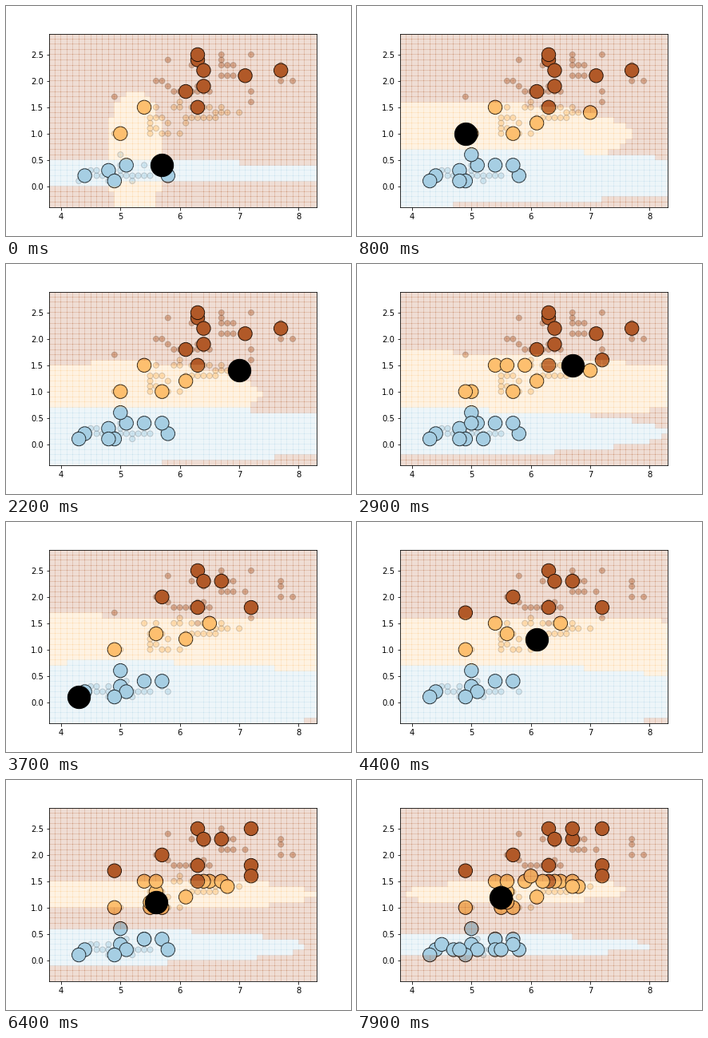
A matplotlib script for the animation above (8 s loop, 432x288 px).

```python
import numpy as np
import matplotlib.pyplot as plt
from matplotlib.animation import FuncAnimation
from matplotlib.colors import to_rgba_array

FRAMES, INTERVAL = 80, 100
X0, X1, Y0, Y1 = 38, 83, -4, 29  # plot limits in tenths
BLUE, ORANGE, BROWN = 0, 1, 2
COLORS = to_rgba_array(["#a6cee3", "#fdbf6f", "#b15928"])

# Labelled samples in query order, in tenths; the first 15 are given
RUN_A = [
    (63, 24), (63, 25), (64, 22), (77, 22), (71, 21), (61, 18), (64, 19),
    (63, 15), (54, 15), (50, 10), (44, 2), (48, 3), (49, 1), (58, 2), (51, 4),
    (57, 4), (43, 1), (50, 6), (48, 1), (57, 10), (54, 4), (61, 12), (70, 14),
    (49, 10), (59, 15), (72, 16), (50, 4), (56, 15), (52, 1), (67, 15),
    (60, 10),
]
RUN_B = [
    (63, 25), (64, 23), (67, 23), (57, 20), (63, 18), (72, 18), (49, 10),
    (56, 13), (61, 12), (65, 15), (50, 3), (51, 2), (49, 1), (54, 4), (44, 2),
    (50, 6), (57, 4), (43, 1), (49, 17), (54, 15), (55, 10), (67, 15),
    (57, 10), (54, 4), (72, 16), (64, 15), (58, 2), (63, 15), (56, 15),
    (68, 14), (72, 25), (55, 11), (56, 11), (67, 25), (57, 3), (59, 15),
    (45, 3), (62, 15), (54, 2), (60, 16), (47, 2), (67, 14), (55, 2), (48, 2),
    (55, 12),
]
LOW_BROWN = {(63, 15), (72, 16)}

# Evenly spaced rows of the remaining pool: y, first x, end, spacing
ROWS = [
    (2, 46, 56, 1), (3, 46, 52, 4), (10, 55, 61, 3), (12, 55, 59, 3),
    (13, 55, 58, 1), (13, 61, 67, 1), (14, 66, 69, 1), (15, 60, 65, 2),
    (18, 59, 66, 1), (19, 58, 64, 5), (20, 56, 58, 1), (20, 77, 80, 2),
    (21, 67, 70, 1), (23, 67, 70, 1), (23, 62, 78, 15), (24, 58, 68, 9),
]

# step: samples shown, then the orange and blue regions as sheared
# ellipses (centre x, centre y, shear, radius x, radius y)
KEYS_A = {
    0: (16, (52, 5.5, 0, 5, 12), (38, 2.1, 0, 69, 2.13)),
    7: (23, (50, 9, 0, 23.2, 6.2), (38, 1.35, 0, 58.7, 5.64)),
    15: (31, (38, 11.4, -.025, 60, 6.1), (45, 1.8, 0, 35.5, 4.17)),
}
KEYS_B = {
    0: (16, (38, 10.8, -.01, 100, 5.31), (49.5, .72, 0, 45.2, 6.4)),
    2: (18, (38, 10.8, -.01, 100, 5.31), (49.5, .72, 0, 45.2, 6.4)),
    17: (24, (38, 9.4, 0, 100, 6), (49, .25, 0, 38.7, 5.95)),
    29: (33, (55, 12, 0, 27.6, 2.88), (45, 2.1, 0, 35.4, 3.3)),
    44: (45, (57, 12.5, .02, 19, 2.2), (45, 2.3, 0, 34.6, 2.19)),
}

# first frame, samples, keys, first step
RUNS = [(0, RUN_A, KEYS_A, 0), (16, RUN_A, KEYS_A, 1), (35, RUN_B, KEYS_B, 0)]

cols = np.arange(X0, X1)
rows = np.arange(Y0, Y1)[:, None]


def label(p):
    if p[1] < 8:
        return BLUE
    return BROWN if p[1] >= 17 or p in LOW_BROWN else ORANGE


def colors(points):
    return COLORS[[label(p) for p in points]]


def inside(cx, cy, shear, rx, ry):
    dx = cols - cx
    dy = rows - cy - shear * dx
    return (dx / rx) ** 2 + (dy / ry) ** 2 < 1


def state(keys, step):
    """Sample count and class grid at a step."""
    table = np.array([np.hstack(k) for k in keys.values()])
    now = [np.interp(step, list(keys), column) for column in table.T]
    grid = np.full((Y1 - Y0, X1 - X0), BROWN)
    grid[inside(*now[1:6])] = ORANGE
    grid[inside(*now[6:])] = BLUE
    return int(now[0] + 1e-9), grid


fig = plt.figure(figsize=(6, 4), dpi=72)
ax = fig.add_axes([0.125, 0.125, 0.775, 0.755])
ax.set(xlim=(X0 / 10, X1 / 10), ylim=(Y0 / 10, Y1 / 10))

pool = sorted({*RUN_A, *RUN_B,
               *((x, y) for y, a, b, d in ROWS for x in range(a, b, d))})
faint = colors(pool)
faint[:, 3] = 0.4
ax.scatter(*np.array(pool).T / 10, s=50, c=faint, edgecolors=(0, 0, 0, 0.2),
           linewidths=1, zorder=1)
known = ax.scatter([], [], s=300, edgecolors="k", linewidths=1, zorder=1.2)
mesh = ax.pcolormesh(np.arange(X0, X1 + 1) / 10, np.arange(Y0, Y1 + 1) / 10,
                     state(KEYS_A, 0)[1], cmap="Paired", vmin=0, vmax=2,
                     alpha=0.2, snap=False, zorder=1.4)
query = ax.scatter([], [], s=800, c="k", zorder=1.6)


def update(frame):
    first, samples, keys, offset = [r for r in RUNS if r[0] <= frame][-1]
    step = frame - first + offset
    count, grid = state(keys, step)
    shown = samples[:count]
    # With nothing new to label, the query revisits a known spot
    if step and state(keys, step - 1)[0] == count:
        current = shown[np.random.default_rng(step).integers(count)]
    else:
        current = shown[-1]
    known.set_offsets(np.array(shown) / 10)
    known.set_facecolor(colors(shown))
    query.set_offsets([np.array(current) / 10])
    mesh.set_array(grid)
    return known, mesh, query


anim = FuncAnimation(fig, update, frames=FRAMES, interval=INTERVAL,
                     init_func=lambda: update(0), repeat=True)
plt.show()
```
